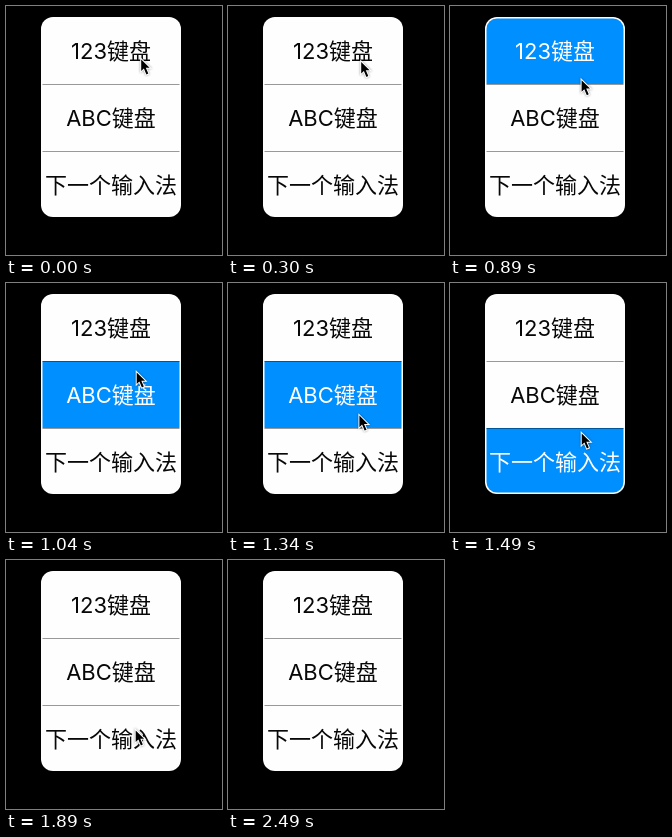
These frames come from a looping animation (216 px wide and 249 px high, 2.59 s). An HTML page:

```html
<!DOCTYPE html>
<html lang="zh-CN">
<head>
<meta charset="utf-8">
<title>键盘菜单</title>
<style>
  html, body { margin: 0; width: 100%; height: 100%; overflow: hidden; background: #000; }
  svg { display: block; }
  text { font: 22px Inter, "Noto Sans CJK SC", "Noto Sans CJK", sans-serif; text-anchor: middle; fill: #080808; }
  .row rect { fill: none; }
  .row.on rect { fill: #008fff; }
  .row.on text { fill: #fff; }
  .divider { stroke: #000; stroke-opacity: .4; }
  #cursor { stroke: #fff; stroke-width: 2; paint-order: stroke; filter: drop-shadow(0 .7px .8px rgba(0, 0, 0, .4)); }
</style>
</head>
<body>
<svg width="216" height="249" viewBox="0 0 216 249">
  <clipPath id="inner"><rect x="36.5" y="12.5" width="137" height="197" rx="10.5"/></clipPath>
  <rect x="35" y="11" width="140" height="200" rx="12" fill="#fefefe"/>
  <g id="menu"></g>
  <path class="divider" d="M36.5 78.5h137m-137 67h137"/>
  <path id="cursor" d="M1.2 2.4V14L3.9 11.4 6.4 17.4 8.3 16.6 5.8 10.8H9.6Z"/>
</svg>
<script>
  const LOOP = 2590;
  const TOP = 11;
  const ROW_HEIGHT = 67;
  const labels = ['123键盘', 'ABC键盘', '下一个输入法'];

  // Pointer stops; the way to the next one is covered in `steps` jumps, eased by `power`.
  const stops = [
    { at: 0, x: 134, y: 51 },
    { at: 300, x: 132, y: 53.5 },
    { at: 590, x: 131.5, y: 53.5, steps: 3, power: 1.5 },
    { at: 1040, x: 129.5, y: 87, steps: 3, power: .85 },
    { at: 1490, x: 130.5, y: 148, steps: 3, power: .65 },
    { at: 1890, x: 128.5, y: 168 },
    { at: 2040, x: 130.5, y: 209.5 },
    { at: 2190, x: 155, y: 240, steps: 2 },
    { at: 2490, x: 162, y: 252 },
  ];

  const menu = document.getElementById('menu');
  const cursor = document.getElementById('cursor');
  menu.innerHTML = labels.map((label, i) => {
    const y = TOP + i * ROW_HEIGHT;
    return `<g class="row">
      <rect x="36" y="${y}" width="138" height="${ROW_HEIGHT}" clip-path="url(#inner)"/>
      <text x="105" y="${y + 42}">${label}</text>
    </g>`;
  }).join('');

  function pointerAt(time) {
    const i = stops.findLastIndex(stop => stop.at <= time);
    const from = stops[i];
    const to = stops[i + 1];
    if (!to) return from;
    const { steps = 1, power = 1 } = from;
    const progress = (time - from.at) / (to.at - from.at);
    const eased = (Math.floor(progress * steps) / steps) ** power;
    return {
      x: from.x + (to.x - from.x) * eased,
      y: from.y + (to.y - from.y) * eased,
    };
  }

  function draw() {
    const time = performance.now() % LOOP;
    const { x, y } = pointerAt(time);
    const pressed = time >= 590 && time < 1630;
    const flash = time >= 1760 && time < 1890;
    const hovered = Math.floor((y - TOP) / ROW_HEIGHT);
    [...menu.children].forEach((row, i) => {
      row.classList.toggle('on', (pressed || flash) && i === hovered);
    });
    cursor.setAttribute('transform', `translate(${x} ${y})`);
    requestAnimationFrame(draw);
  }
  draw();
</script>
</body>
</html>
```
